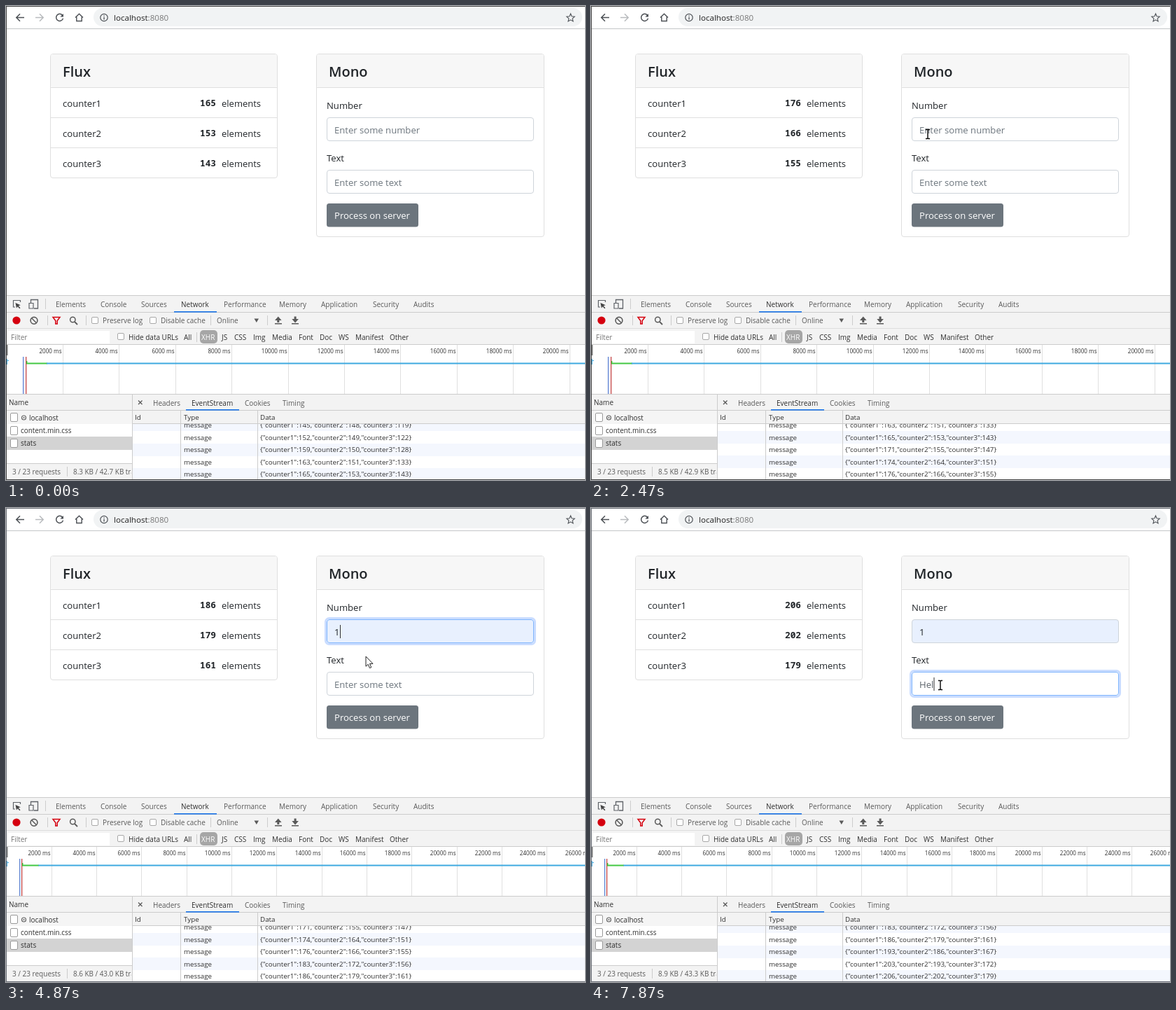
These frames come from a looping animation (827 by 677 pixels, 8 s). An HTML page:

```html
<!DOCTYPE html>
<html lang="en">
<head>
<meta charset="utf-8">
<title>Live counters</title>
<style>
html, body { margin: 0; width: 100%; height: 100%; overflow: hidden; background: #fff; }
svg { display: block; width: 100%; height: 100%; }
text { font-family: "Open Sans", "Noto Sans", sans-serif; white-space: pre; }
.mono { font-family: "Noto Sans Mono", "DejaVu Sans Mono", monospace; }
</style>
</head>
<body>
<svg id="stage" viewBox="0 0 827 677" xmlns="http://www.w3.org/2000/svg"></svg>
<script>
const LOOP = 8000, FPS = 15;
const INK = '#212529', MUTED = '#6c757d', TOOL = '#5a5a5a', DARK = '#303030', LINE = '#ccc', BAR = '#f3f3f3', ACCENT = '#1a73e8';

// Markup helpers; text sits on whole-pixel baselines
const rect = (x, y, w, h, fill, more = '') => `<rect x="${x}" y="${y}" width="${w}" height="${h}" fill="${fill}" ${more}/>`;
const box = (x, y, w, h, fill, stroke, r = 3.5, more = '') =>
  rect(x + .5, y + .5, w - 1, h - 1, fill, `stroke="${stroke}" rx="${r}" ${more}`);
const text = (x, y, str, size, fill = INK, more = '') =>
  `<text x="${x}" y="${Math.round(y)}" font-size="${size}" fill="${fill}" ${more}>${str}</text>`;
const path = (d, stroke, width = 1.5, fill = 'none', more = '') =>
  `<path d="${d}" stroke="${stroke}" stroke-width="${width}" fill="${fill}" ${more}/>`;
const circle = (x, y, r, fill, stroke = 'none', width = 1) =>
  `<circle cx="${x}" cy="${y}" r="${r}" fill="${fill}" stroke="${stroke}" stroke-width="${width}"/>`;
const row = (y, size, fill, items) => items.map(([x, str]) => text(x, y, str, size, fill)).join('');
const vline = (x, y1, y2, fill = LINE) => rect(x, y1, 1, y2 - y1, fill);

// Counter values: five visible rows at the start, then one per update
const counts = [
  [145, 148, 119], [152, 149, 122], [159, 150, 128], [163, 151, 133], [165, 153, 143],
  [171, 155, 147], [174, 164, 151], [176, 166, 155], [183, 172, 156], [186, 179, 161],
  [193, 186, 167], [203, 193, 172], [206, 202, 179]
];
const updates = [400, 1400, 2267, 3467, 4400, 5267, 6267, 7267];
const kilobytes = [8.3, 8.4, 8.4, 8.5, 8.6, 8.6, 8.7, 8.8, 8.9];
const updatesBy = t => updates.filter(u => u <= t + 1).length;

// Pointer way points: time, x, y
const pointerPath = [
  [1400, 400, 684], [1600, 379, 446], [1733, 373, 421], [2200, 481, 183], [3467, 481, 183], [3867, 518, 198],
  [4467, 518, 198], [4600, 514, 212], [5200, 514, 212], [5533, 497, 260], [5867, 497, 260],
  [5933, 499, 253], [LOOP, 499, 253]
];
const time = { numberFocus: 3333, preview: 4533, pick: 4867, textFocus: 5867, type: [7333, 7533, 7867] };

const clamp = v => Math.max(0, Math.min(1, v));
const ease = v => v * v * (3 - 2 * v);
const caretOn = (t, since) => Math.floor((t - since + 5) / 532) % 2 === 0;

function pointerAt(t) {
  if (t < pointerPath[0][0]) return null;
  const i = pointerPath.findIndex(k => k[0] > t);
  const [t0, x0, y0] = pointerPath[i - 1], [t1, x1, y1] = pointerPath[i];
  const p = (t - t0) / (t1 - t0);
  return { x: x0 + (x1 - x0) * p, y: y0 + (y1 - y0) * p };
}

function browserBar() {
  const c = '#4d5156';
  return rect(0, 32, 827, 1, '#c4c6c8') + rect(125, 3, 698, 26, '#f1f3f4', 'rx="13"') +
    path('M26 16.5H15M20 11.2L14.8 16.5L20 21.8', c) +
    path('M42 16.5H53M48 11.2L53.2 16.5L48 21.8', '#b9bbbe') +
    path('M80.6 13.3A5 5 0 1 0 81.5 17.6', c) + path('M82 11V15.6H77.4Z', 'none', 0, c) +
    path('M99 16.5L104.5 11.2L110 16.5M100.8 15.5V21.5H108.2V15.5', c, 1.4) +
    circle(140, 16.5, 5.2, 'none', c, 1.2) + rect(139.4, 15.8, 1.3, 3.7, c) + rect(139.4, 13.4, 1.3, 1.3, c) +
    text(154, 21, 'localhost<tspan fill="#777">:8080</tspan>', 11.6, '#222') +
    path('M806.5 11L808.1 14.8L812.2 15.2L809.1 17.9L810 21.9L806.5 19.8L803 21.9L803.9 17.9L800.8 15.2L804.9 14.8Z', c, 1.1);
}

function cards() {
  const card = (x, w, h, title) => box(x, 68, w, h, '#fff', '#dfdfdf') +
    rect(x + 1, 69, w - 2, 47, '#f7f7f7', 'rx="2.5"') + rect(x + 1, 116, w - 2, 1, '#dfdfdf') +
    text(x + 18, 101, title, 20, INK, 'font-weight="600"');
  let out = card(63, 325, 178, 'Flux') + card(443, 326, 262, 'Mono');
  for (let i = 0; i < 3; i++) {
    const y = 144 + 43 * i;
    if (i) out += rect(64, 116 + 43 * i, 323, 1, '#dfdfdf');
    out += text(81, y, 'counter' + (i + 1), 13.1) + text(308, y, 'elements', 13);
  }
  return out + text(458, 147, 'Number', 13.1) + text(458, 222, 'Text', 13.1) +
    rect(458, 282, 131, 33.5, MUTED, 'rx="3.5"') + text(469, 304, 'Process on server', 13.1, '#fff');
}

function devtools() {
  const check = (x, y) => box(x, y, 10, 10, '#fff', '#a8a8a8', 1.5);
  const bars = rect(0, 413, 827, 71, BAR) + rect(0, 413, 827, 1, LINE) + rect(0, 437, 827, 1, LINE) +
    rect(0, 460, 827, 1, '#ddd') + rect(0, 483, 827, 1, LINE);
  const tabIcons = path('M13 430H10.5V420.5H20.5V423', '#5f6368', 1.2) + path('M13.5 424L20.8 427.2L17.8 428.2L20.5 431.2L19.3 432.2L16.7 429.2L15 431.6Z', 'none', 0, '#444') +
    path('M35.5 424V419.5H45.5V432H40', '#5f6368', 1.3) + path('M33 424.5H39V432H33Z', '#5f6368', 1.2) + vline(56, 418, 433);
  const tools = circle(15, 449, 5.6, '#d5000f') + circle(40, 449.3, 4.9, 'none', TOOL, 1.6) + path('M36.6 445.8L43.5 452.8', TOOL, 1.5) +
    path('M67 444.5H77L73.2 449.5V454H70.8V449.5Z', '#d5000f', 1.5) +
    circle(95.3, 448, 3.7, 'none', TOOL, 1.5) + path('M98 451L102 455', TOOL, 1.8) +
    [59, 114, 292, 373].map(x => vline(x, 442, 456)).join('') + check(122, 444) + check(205, 444) +
    row(453, 10, TOOL, [[138, 'Preserve log'], [221, 'Disable cache'], [301, 'Online']]) +
    path('M354.5 446.5H361L357.8 452Z', 'none', 0, TOOL) +
    path('M384 449L388.8 443.5L393.6 449H390.3V452H387.3V449Z', 'none', 0, TOOL) + rect(384, 453, 10, 1.5, TOOL) +
    path('M408.3 447L413.1 452.5L417.9 447H414.6V443.5H411.6V447Z', 'none', 0, TOOL) + rect(408, 453, 10, 1.5, TOOL);
  const filters = rect(3, 464, 145, 18, '#fff') + text(7, 477, 'Filter', 10, '#777') + check(159, 467) +
    rect(277, 463, 25, 19, '#a6a6a6', 'rx="5"') + text(279, 477, 'XHR', 10, '#fff') + vline(272, 466, 480) +
    row(477, 10, DARK, [[175, 'Hide data URLs'], [254, 'All'], [308, 'JS'], [326, 'CSS'], [353, 'Img'], [380, 'Media'],
      [418, 'Font'], [448, 'Doc'], [475, 'WS'], [499, 'Manifest'], [548, 'Other']]);
  return bars + '<g id="tabHover"></g>' + tabIcons +
    row(430, 10, TOOL, [[71, 'Elements'], [135, 'Console'], [193, 'Sources'], [311, 'Performance'], [390, 'Memory'],
      [450, 'Application'], [524, 'Security'], [582, 'Audits']]) +
    text(250, 430, 'Network', 10, DARK) + rect(240, 436, 61, 1.6, ACCENT) + tools + filters;
}

function panels() {
  const file = y => box(6, y, 11, 13, '#fff', '#9a9a9a', 1.5);
  const left = rect(0, 554, 827, 24, BAR) + rect(0, 554, 827, 1, LINE) + rect(0, 577, 827, 1, LINE) +
    text(4, 570, 'Name', 10, DARK) + rect(0, 578, 180, 19, '#f5f5f5') + rect(0, 615, 180, 19, '#d3d3d3') +
    file(581) + file(600) + file(618) + circle(25.5, 588, 3, 'none', '#666', 1.2) + circle(25.5, 588, 1, '#666') +
    text(33, 592, 'localhost', 10, DARK) + text(21, 610, 'content.min.css', 9.9, DARK) + text(21, 628, 'stats', 10, DARK) +
    rect(0, 653, 180, 24, BAR) + rect(0, 653, 180, 1, LINE) + vline(87, 658, 672) + text(9, 669, '3 / 23 requests', 10, TOOL);
  const right = path('M189 563.5L194.5 569M194.5 563.5L189 569', TOOL, 1.3) +
    row(571, 10, TOOL, [[210, 'Headers'], [341, 'Cookies'], [395, 'Timing']]) + text(265, 571, 'EventStream', 10, DARK) +
    rect(257, 576, 76, 1.6, ACCENT) + rect(181, 578, 646, 19, BAR) + rect(181, 596, 646, 1, LINE) +
    row(591, 9.8, DARK, [[184, 'Id'], [254, 'Type'], [363, 'Data']]);
  const columns = vline(180, 554, 677) + vline(249, 578, 677) + vline(359, 578, 677);
  return left + right + '<g id="events" clip-path="url(#rows)"></g>' + columns;
}

function ruler(step) {
  const k = step / 80.4;
  let out = '';
  for (let i = 1; i * step < 900; i++) {
    const x = Math.round(.6 + i * step);
    out += vline(x, 484, 554, '#e0e0e0') + text(x - 1.5, 496, i * 2000 + ' ms', 8.1, DARK, 'text-anchor="end"');
  }
  const red = Math.round(28 * k);
  return out + rect(1, 484, 1.5, 15, '#777') + rect(1, 504, 1, 8, '#46a8dc') + rect(2, 506, 2, 1, '#46a8dc') +
    rect(Math.round(25 * k) - 1, 501, 1.3, 53, '#5b84d6') + rect(red, 501, 1.3, 53, '#c64848') +
    rect(red + 1, 507, 1.5, 4, '#43c743') + rect(red + 1, 509.5, 30 * k, 2, '#43c743') + rect(58 * k, 509.5, 827, 2, '#3fa9e0');
}

function eventRows(listed) {
  return counts.slice(listed, listed + 5).map((c, i) => {
    const y = 602 + 17.6 * i;
    const data = c.map((n, j) => `"counter${j + 1}":${n}`).join(',');
    const stripe = (listed + i) % 2 ? '' : rect(181, Math.round(y - 12.6), 646, 18, '#f4f7fe');
    return stripe + text(254, y, 'message', 9.75, DARK) + text(363, y, `{${data}}`, 9.82, DARK);
  }).join('');
}

function input(y, value, hint, focus, filled, caretX) {
  const f = ease(focus);
  const border = `rgb(${206 - 78 * f},${212 - 30 * f},${218 + 35 * f})`;
  return (f ? rect(456.5, y - 1.5, 299, 37, 'none', `rx="5" stroke="rgb(40,115,255)" stroke-width="3" opacity="${.25 * f}"`) : '') +
    box(458, y, 296, 34, filled ? '#e8f0fe' : '#fff', border) +
    text(469, y + 23, value || hint, 13.1, value ? (filled ? INK : '#5c636a') : MUTED) +
    (caretX ? rect(caretX, y + 8, 1, 19, '#333') : '');
}

function dropdown(y, items, hovered) {
  const h = items.length * 31.7 + 15;
  return rect(457, y, 297, h, '#fff', 'rx="2" filter="url(#shadow)"') +
    (hovered ? rect(457, y + 8, 297, 31, '#eee') : '') +
    items.map((s, i) => text(467.5, y + 27 + 31.7 * i, s, 10.3, '#111', 'font-weight="600"')).join('');
}

function pointer({ x, y }) {
  const inField = x > 458 && x < 754 && ((y > 159 && y < 192) || (y > 235 && y < 268));
  const place = `transform="translate(${x.toFixed(1)} ${y.toFixed(1)})"`;
  if (inField) return path('M-3 -6.5H-1L0 -5.8L1 -6.5H3M0 -6V6M-3 6.5H-1L0 5.8L1 6.5H3', '#000', 1.4, 'none', place);
  if (y > 414 && y < 437)
    return path('M-2.5 0.5Q-.8 -2 .8 .5V7L2.8 6.2L4 7.5L5.7 7L7 8.5L8.5 9V13L6.5 18.5H-1.5L-6 12Q-5.8 9.3 -2.5 12Z', '#111', 1.1, '#fff', place) +
      path('M.8 7V11M4 8V11.5M6.6 9V12', '#111', .7, 'none', place);
  return path('M0 0V14.2L3.2 11.3L5.5 16.6L7.8 15.6L5.5 10.4H10Z', '#222', 1, '#fff', place);
}

const stage = document.getElementById('stage');
stage.innerHTML = `<defs>
  <clipPath id="rows"><rect x="181" y="597" width="646" height="80"/></clipPath>
  <clipPath id="status"><rect x="88" y="654" width="91" height="23"/></clipPath>
  <filter id="shadow" x="-5%" y="-10%" width="110%" height="125%"><feDropShadow dx="0" dy="1.2" stdDeviation="1.5" flood-color="#000" flood-opacity=".4"/></filter>
  </defs>` + rect(0, 0, 827, 677, '#fff') + browserBar() + cards() + devtools() + panels() +
  '<g id="timeline"></g><g id="numbers"></g><g id="traffic" clip-path="url(#status)"></g><g id="form"></g><g id="border"></g><g id="overlay"></g>';
const layer = id => document.getElementById(id);

function draw(t) {
  const shown = updatesBy(t), listed = updatesBy(t - 67);
  layer('numbers').innerHTML = counts[shown + 4].map((n, i) =>
    text(277, 143 + 43 * i, n, 12.8, INK, 'class="mono" font-weight="700"')).join('');
  layer('events').innerHTML = eventRows(listed);
  const kb = kilobytes[listed];
  layer('traffic').innerHTML = text(96, 669, `${kb.toFixed(1)} KB / ${(kb + 34.4).toFixed(1)} KB transferred`, 9.9, TOOL);
  layer('timeline').innerHTML = ruler(t < 4400 ? 80.4 : 64.3);

  // The window frame is darker until the page is clicked
  const frame = t < time.numberFocus ? '#444' : '#6c7078';
  layer('border').innerHTML = vline(0, 0, 677, frame) + rect(0, 0, 827, 1, frame) + rect(0, 676, 827, 1, frame);

  const onText = t >= time.textFocus, onNumber = t >= time.numberFocus && !onText;
  const filled = t >= time.preview, typed = time.type.filter(k => k <= t + 1);
  const fade = since => clamp((t - since - 33) / 150);
  const numberCaret = onNumber && caretOn(t, t < time.pick ? time.numberFocus : time.pick);
  const textCaret = onText && caretOn(t, typed.length ? typed[typed.length - 1] : time.textFocus);
  layer('form').innerHTML =
    input(159, filled ? '1' : '', 'Enter some number', onText ? 1 - fade(time.textFocus) : fade(time.numberFocus), filled,
      numberCaret && (filled ? 477 : 469)) +
    input(234, 'Hel'.slice(0, typed.length), 'Enter some text', fade(time.textFocus), false,
      textCaret && [469, 479, 486, 489.5][typed.length]);

  const at = pointerAt(t);
  const onTabs = at && at.y > 414 && at.y < 437;
  layer('tabHover').innerHTML = onTabs ? rect(301, 414, 79, 23, '#e6e6e6') : '';

  let over = '';
  const tip = t < 1700 ? clamp((t - 1580) / 100) : clamp((1950 - t) / 250);
  if (tip) over += `<g opacity="${tip * .8}">` + box(376, 463, 94, 22, 'rgba(255,255,255,.75)', '#aaa', 1) + text(380, 477, 'Import HAR file...', 10, TOOL) + '</g>';
  if (onNumber && t < time.pick) over += dropdown(192, ['1', '2342', 'lklkj'], filled);
  if (onText && !typed.length) over += dropdown(269, ['1', 'qeqe', 'lklk', '123', '123123', '11']);
  layer('overlay').innerHTML = over + (at ? pointer(at) : '');
}

let last = -1;
const start = performance.now();
function tick() {
  const step = Math.floor(((performance.now() - start) % LOOP + 4) * FPS / 1000) % (LOOP * FPS / 1000);
  if (step !== last) draw(Math.round((last = step) * 1000 / FPS));
  requestAnimationFrame(tick);
}
tick();
</script>
</body>
</html>
```
